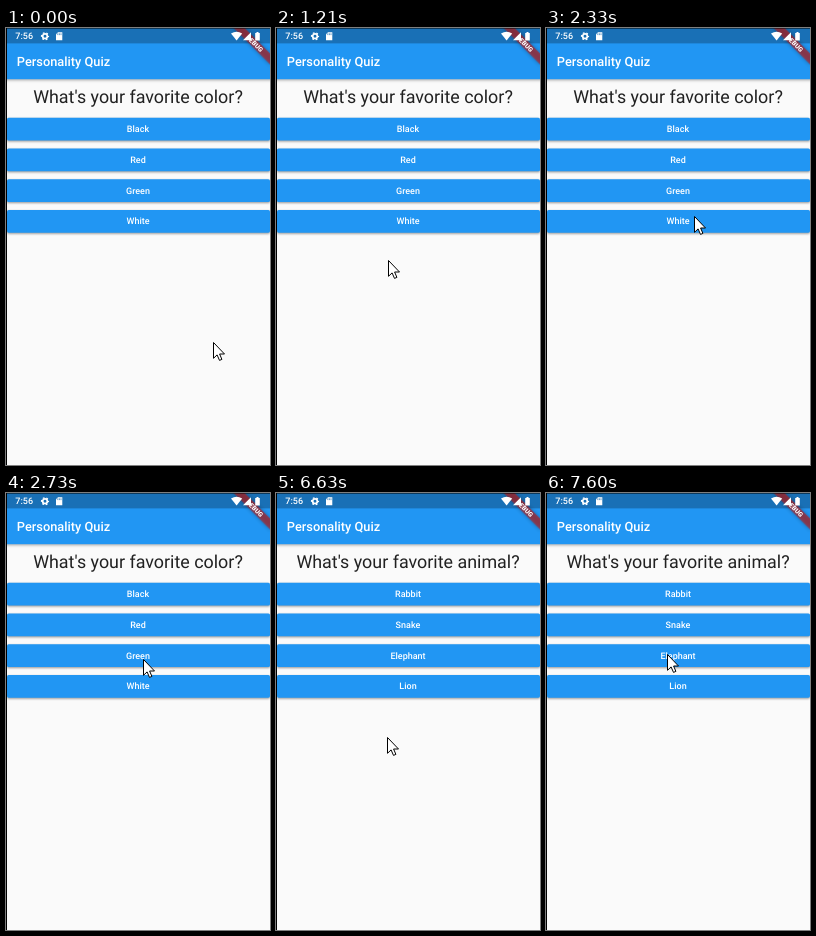
Recreate the animation shown at these times as an HTML page. Size 264 px wide and 437 px high, loop 8000 ms.

```html
<!DOCTYPE html>
<html lang="en">
<head>
<meta charset="utf-8">
<title>Personality Quiz</title>
<style>
  html, body { margin: 0; width: 100%; height: 100%; overflow: hidden; background: #fafafa; }
  svg { display: block; width: 264px; height: 437px; }
  text { font-family: Roboto, sans-serif; text-rendering: geometricPrecision; }
  .bar { fill: #2196f3; filter: drop-shadow(0 1.5px 1.5px #0005); }
  .button { fill: #2196f3; filter: drop-shadow(0 1px .8px #0006); }
  .raised { fill: #2196f3; filter: drop-shadow(0 2px 2px #0008); animation: raised 8s step-end infinite; }
  .title { font-size: 12.8px; font-weight: 500; fill: #fff; }
  .question { font-size: 17.9px; fill: #212121; text-anchor: middle; }
  .label { font-size: 9px; font-weight: 500; fill: #fff; text-anchor: middle; }
  .clock { font-size: 9px; font-weight: 500; fill: #fff; }
  .banner { fill: #b71c1c; fill-opacity: .68; filter: drop-shadow(0 0 2px #0007); }
  .debug { font-size: 6.5px; font-weight: 900; fill: #fff; text-anchor: middle; }
  .color { animation: color 8s step-end infinite; }
  .animal { animation: animal 8s step-end infinite; }
  .cursor { animation: move 8s step-end infinite; }

  @keyframes color { 0% { visibility: visible } 71.625%, 100% { visibility: hidden } }
  @keyframes animal { 0% { visibility: hidden } 71.625%, 100% { visibility: visible } }
  @keyframes raised { 0% { visibility: hidden } 71.625% { visibility: visible } 73.25%, 100% { visibility: hidden } }
  @keyframes move {
    0% { transform: translate(207px, 314px) }
    6.125% { transform: translate(198px, 309px) }
    7.75% { transform: translate(191px, 306px) }
    15.125% { transform: translate(112px, 232px) }
    17% { transform: translate(102px, 222px) }
    22.125% { transform: translate(111px, 214px) }
    24% { transform: translate(135px, 207px) }
    25.75% { transform: translate(142px, 204px) }
    27.375% { transform: translate(146px, 202px) }
    29.125% { transform: translate(148px, 188px) }
    30.75% { transform: translate(143px, 171px) }
    32.625% { transform: translate(139px, 168px) }
    34.125% { transform: translate(137px, 166px) }
    82.875% { transform: translate(111px, 244px) }
    84.875% { transform: translate(107px, 251px) }
    86.375% { transform: translate(121px, 220px) }
    87.875% { transform: translate(132px, 190px) }
    89.625% { transform: translate(132px, 181px) }
    91.5% { transform: translate(127px, 171px) }
    93.125% { transform: translate(122px, 163px) }
    95%, 100% { transform: translate(121px, 161px) }
  }
</style>
</head>
<body>
<svg viewBox="0 0 264 437">
  <rect width="264" height="437" fill="#fafafa"/>

  <!-- App bar -->
  <rect class="bar" x="-4" width="272" height="51.2"/>
  <rect width="264" height="15.4" fill="#1970b6"/>
  <text class="title" x="10.8" y="38.4">Personality Quiz</text>

  <!-- Buttons -->
  <g class="button">
    <rect id="button" x="1" y="89.8" width="263" height="22.8" rx="1.6"/>
    <use href="#button" y="30.7"/>
    <use href="#button" y="61.4"/>
    <use href="#button" y="92.1"/>
  </g>

  <g class="color">
    <text class="question" x="132" y="75">What's your favorite color?</text>
    <g class="label">
      <text x="132" y="104.2">Black</text>
      <text x="132" y="134.9">Red</text>
      <text x="132" y="165.6">Green</text>
      <text x="132" y="196.3">White</text>
    </g>
  </g>

  <g class="animal">
    <g class="raised"><use href="#button" y="61.4"/></g>
    <text class="question" x="132" y="75">What's your favorite animal?</text>
    <g class="label">
      <text x="132" y="104.2">Rabbit</text>
      <text x="132" y="134.9">Snake</text>
      <text x="132" y="165.6">Elephant</text>
      <text x="132" y="196.3">Lion</text>
    </g>
  </g>

  <!-- Corner banner -->
  <g transform="translate(264 0) rotate(45)">
    <rect class="banner" x="-26" y="17.9" width="52" height="7.7"/>
    <text class="debug" y="24.1">DEBUG</text>
  </g>

  <!-- Status bar -->
  <text class="clock" x="9.3" y="11.4">7:56</text>
  <g fill="none" stroke="#fff">
    <circle cx="39" cy="8.2" r="2.3" stroke-width="1.7"/>
    <circle cx="39" cy="8.2" r="3.5" stroke-width="1.2" stroke-dasharray="1.8 1.865" stroke-dashoffset=".9"/>
  </g>
  <g fill="#fff">
    <path d="M52 4.2h4.3v8h-6.3v-6z"/>
    <path d="M225 5.6Q230.6 1.8 236.2 5.6L230.6 12.4z"/>
    <path d="M245 4.2v8h-8z"/>
    <path d="M249.2 5h1.3v-1h2v1h1.3v7.4h-4.6z"/>
  </g>
  <path d="M51.8 5.3v1.8M53.4 5.3v1.8M55 5.3v1.8" stroke="#1970b6" stroke-width=".7"/>

  <path d="M0 .5H264" stroke="#000" stroke-opacity=".5"/>
  <path d="M.5 0V437" stroke="#000"/>

  <g class="cursor">
    <path d="M.5 .5V16.3L4.1 12.9L6.5 18.4L8.9 17.4L6.6 12H11.5z" fill="#fff" stroke="#000"/>
  </g>
</svg>
</body>
</html>
```
